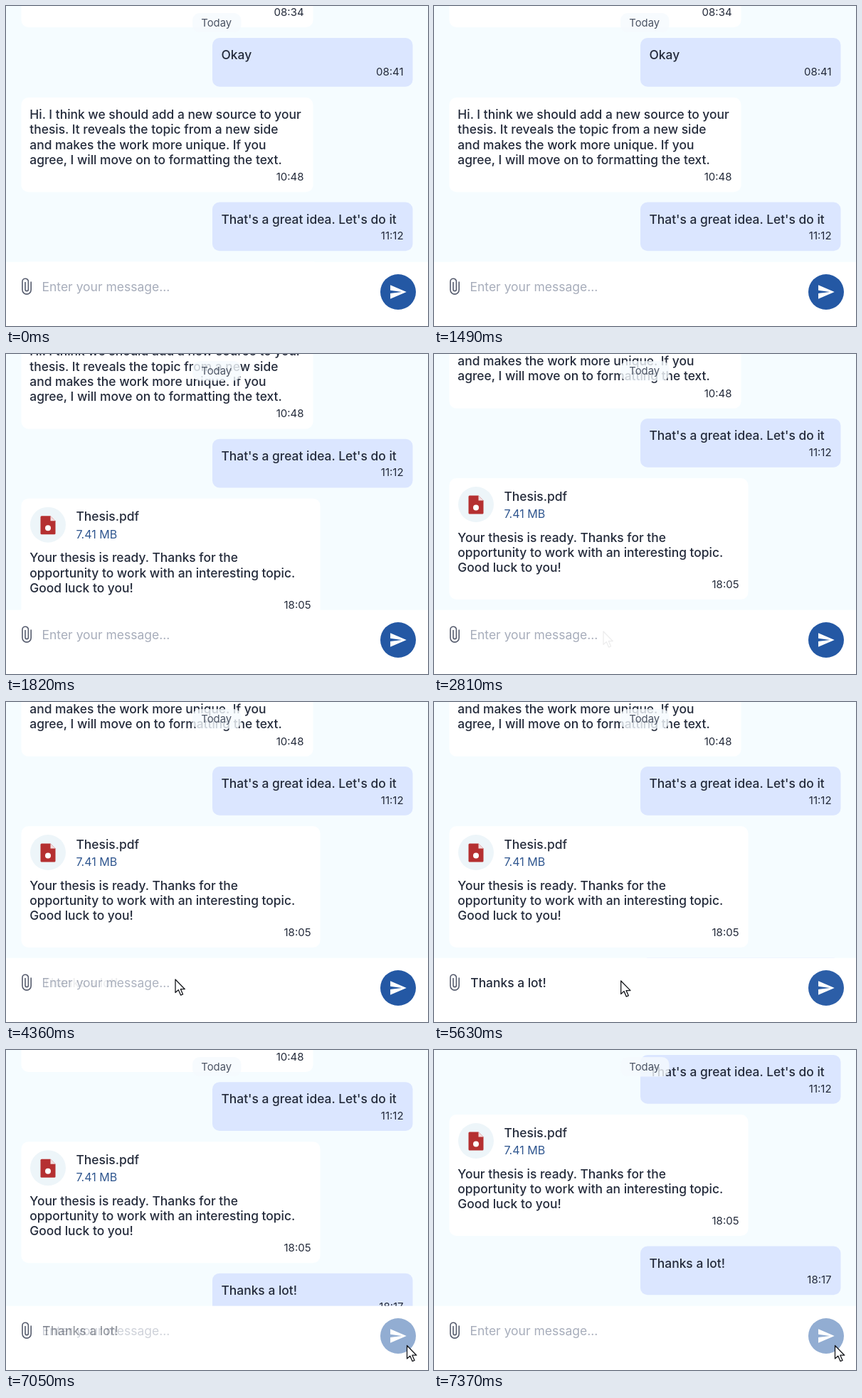
An HTML page that plays this animation: 593 by 451 pixels, repeating every 8000 ms.

```html
<!DOCTYPE html>
<html lang="en">
<head>
<meta charset="utf-8">
<title>Chat</title>
<style>
  html, body { margin: 0; width: 100%; height: 100%; overflow: hidden; background: #f5fcff; }
  svg { display: block; width: 593px; height: 451px; }
  text { font: 500 17.4px Inter, Roboto, sans-serif; font-optical-sizing: none; fill: #242b3b; white-space: pre; }
  .time { font-size: 15px; font-weight: 400; text-anchor: end; }
  .size { font-size: 16px; font-weight: 400; fill: #2f568f; }
  .day { font-size: 14.8px; font-weight: 400; fill: #4b5363; text-anchor: middle; }
  .hint { font-size: 17.5px; font-weight: 400; fill: #a7adbb; }
</style>
</head>
<body>
<svg viewBox="0 0 593 451">
  <rect width="593" height="451" fill="#f5fcff"/>
  <g id="chat"></g>

  <rect x="262" y="10" width="68.5" height="27.5" rx="10" fill="#f5fbfe" fill-opacity=".8"/>
  <text class="day" x="295.7" y="29.4">Today</text>

  <rect y="360.7" width="593" height="91" fill="#fff"/>
  <path d="M35.2 388.5V400a6.1 6.1 0 0 1-12.2 0V388.4a4.2 4.2 0 0 1 8.4 0V399.4a2.2 2.2 0 0 1-4.4 0V389"
        fill="none" stroke="#565c6e" stroke-width="1.6"/>
  <text class="hint" id="hint" x="50.5" y="401.8">Enter your message...</text>
  <text id="draft" x="51.3" y="401.8">Thanks a lot!</text>

  <circle id="button" cx="551" cy="403" r="25"/>
  <path transform="translate(537.9 390) scale(1.08)" fill="#fff" d="M2 21L23 12 2 3V10L17 12 2 14Z"/>

  <path id="pointer" d="M0 0V18.6L4.3 14.7 7.6 22.2 10.6 20.9 7.4 13.7H13.3Z"
        fill="#fff" stroke="#16181d" stroke-width="1.3" stroke-linejoin="round"/>
</svg>
<script>
const LOOP = 8000, EASE_MS = 500, HOLD = 40, FRAME = 1000 / 24;
const LEFT = 21.5, RIGHT = 290;
const $ = id => document.getElementById(id);
const chat = $('chat');

function add(parent, tag, attrs, content = '') {
  const el = document.createElementNS('http://www.w3.org/2000/svg', tag);
  for (const key in attrs) el.setAttribute(key, attrs[key]);
  el.textContent = content;
  return parent.appendChild(el);
}

function bubble(x, y, w, h, lines, time, first = 30.2) {
  const g = add(chat, 'g', {});
  add(g, 'rect', { x, y, width: w, height: h, rx: 10, fill: x === RIGHT ? '#dbe6ff' : '#fff' });
  lines.forEach((line, i) =>
    add(g, 'text', { x: x + (x === RIGHT ? 12.5 : 11.8), y: y + first + i * 21.2 }, line));
  add(g, 'text', { class: 'time', x: x + w - 12.9, y: y + h - 16 }, time);
  return g;
}

bubble(LEFT, -70, 410, 100, [], '08:34');
bubble(RIGHT, 45, 281.5, 68.8, ['Okay'], '08:41');
bubble(LEFT, 129, 410, 133.3, [
  'Hi. I think we should add a new source to your',
  'thesis. It reveals the topic from a new side',
  'and makes the work more unique. If you',
  'agree, I will move on to formatting the text.'
], '10:48');
bubble(RIGHT, 276.5, 281.5, 68.8, ["That's a great idea. Let's do it"], '11:12');

const file = bubble(LEFT, 360.5, 420, 171, [
  'Your thesis is ready. Thanks for the',
  'opportunity to work with an interesting topic.',
  'Good luck to you!'
], '18:05', 89.7);
add(file, 'circle', { cx: 59, cy: 397.5, r: 25, fill: '#edf5f9' });
add(file, 'path', { d: 'M50 385H62.5L69.5 392V409.5Q69.5 411 68 411H50Q48.5 411 48.5 409.5V386.5Q48.5 385 50 385Z', fill: '#b53031' });
add(file, 'path', { d: 'M62.5 385L69.5 392H62.5Z', fill: '#f1dcde' });
add(file, 'circle', { cx: 59, cy: 402, r: 4, fill: '#fff' });
add(file, 'text', { x: 98.5, y: 392.1 }, 'Thesis.pdf');
add(file, 'text', { class: 'size', x: 98.5, y: 416.8 }, '7.41 MB');

const reply = bubble(RIGHT, 546, 281.5, 68.8, ['Thanks a lot!'], '18:17');

// CSS ease-out curve: cubic-bezier(0, 0, .58, 1)
function easeOut(x) {
  let lo = 0, hi = 1;
  for (let i = 0; i < 24; i++) {
    const u = (lo + hi) / 2;
    if (1.74 * (1 - u) * u * u + u ** 3 < x) lo = u; else hi = u;
  }
  return 3 * (1 - lo) * lo * lo + lo ** 3;
}

// Progress of a transition sampled at 24 fps; lead is its age on the first step.
function progress(t, start, lead = 23) {
  if (t < start) return 0;
  const age = Math.floor((t - start) / HOLD) * FRAME + lead;
  return age >= EASE_MS ? 1 : easeOut(age / EASE_MS);
}

const mix = (a, b, p) => a + (b - a) * p;
const IDLE = [36, 88, 164], HOVER = [146, 173, 210];

function draw(t) {
  const arrive = progress(t, 1500, 1);
  const appear = progress(t, 2810);
  const typed = progress(t, 4360);
  const hover = progress(t, 5630);
  const sent = progress(t, 6890);

  chat.setAttribute('transform', `translate(0 ${-185.5 * arrive - 84 * sent})`);
  reply.setAttribute('opacity', t < 5630 ? 0 : 1);
  $('hint').setAttribute('opacity', 1 - typed + sent);
  $('draft').setAttribute('opacity', typed - sent);
  $('button').setAttribute('fill', `rgb(${IDLE.map((c, i) => Math.round(mix(c, HOVER[i], hover)))})`);
  $('pointer').setAttribute('opacity', appear);
  $('pointer').setAttribute('transform', `translate(${mix(238, 563.5, hover)} ${mix(391, 416.5, hover)})`);
}

const began = performance.now();
function tick() {
  draw((performance.now() - began) % LOOP);
  requestAnimationFrame(tick);
}
tick();
</script>
</body>
</html>
```
